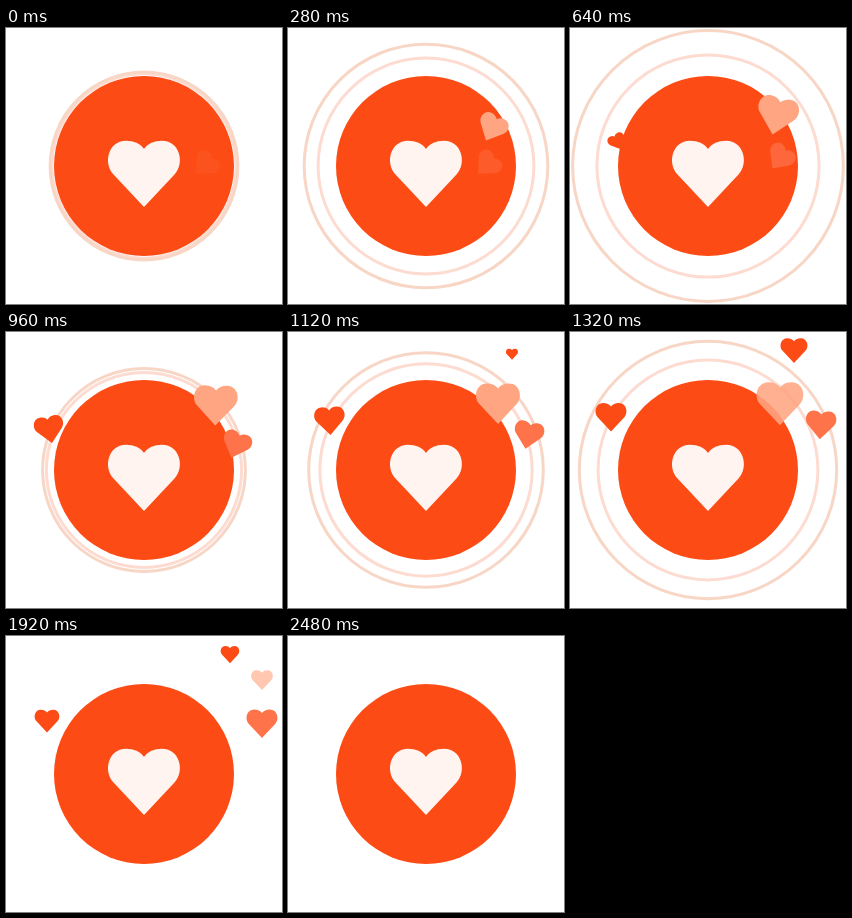
Animation of 276 by 276 pixels, one loop 3.92 s. Source, as an HTML page with a canvas:

```html
<!DOCTYPE html>
<html lang="en">
<head>
<meta charset="utf-8">
<title>Heart pulse</title>
<style>
  html, body { margin: 0; width: 100%; height: 100%; overflow: hidden; background: #fff; }
  canvas { display: block; }
</style>
</head>
<body>
<canvas id="stage" width="276" height="276"></canvas>
<script>
const ctx = document.getElementById('stage').getContext('2d');
const LOOP = 3920, STEP = 40, END = 2480, MID = 138, RADIUS = 90;
const RED = '#fc4b14', CORAL = '#ff734a', PEACH = '#ffa582';

// Heart 72 units wide, centred on the origin
const HEART = new Path2D('M0 33.5 L-30.5 1 C-41 -10 -36 -32.7 -18 -32.7 C-10 -32.7 -4 -30 0 -24.5 C4 -30 10 -32.7 18 -32.7 C36 -32.7 41 -10 30.5 1 Z');

// Each heart pops in, drifts upright to its place, then shrinks or swells and fades away
const hearts = [
  { color: CORAL, size: 31, pop: -600, drift: 280, settle: 1560, from: [199, 137], to: [256, 87.5], tilt: 45, leave: 1920, emerge: 960 },
  { color: PEACH, size: 44, pop: 20, drift: 200, settle: 1080, from: [204, 100.5], to: [210, 71.5], tilt: 27, leave: 1270, swell: true },
  { color: RED, size: 31, pop: 440, drift: 480, settle: 1280, from: [48, 116], to: [41, 85], tilt: -30, leave: 1840 },
  { color: RED, size: 31, pop: 1000, drift: 1000, settle: 1280, from: [224, 24], to: [224, 18.5], tilt: 0, leave: 1760 },
  { color: PEACH, size: 18.6, pop: 1480, drift: 1480, settle: 1800, from: [256, 50], to: [256, 44], tilt: 0, leave: 1600, span: 880, swell: true }
];

const ramp = (t, from, to) => Math.min(1, Math.max(0, (t - from) / (to - from)));
const mix = (a, b, p) => a + (b - a) * p;
const smooth = p => p * p * (3 - 2 * p);
const easeOut = p => 1 - (1 - p) ** 2;

function drawHeart(x, y, width, degrees, color, alpha = 1) {
  ctx.save();
  ctx.translate(x, y);
  ctx.rotate(degrees * Math.PI / 180);
  ctx.scale(width / 72, width / 72);
  ctx.globalAlpha = alpha;
  ctx.fillStyle = color;
  ctx.fill(HEART);
  ctx.restore();
}

function drawFlyer(t, h) {
  const p = smooth(ramp(t, h.drift, h.settle));
  const out = ramp(t, h.leave, h.leave + (h.span || 400));
  const enter = easeOut(ramp(t, h.pop, h.pop + 500));
  const width = h.size * enter * mix(0.87, 1, p) * (h.swell ? 1 + out / 2 : 1 - out);
  const shown = h.emerge ? ramp(t, -200, h.emerge) : 1;
  // Height lags behind so that the path bends upwards
  drawHeart(mix(h.from[0], h.to[0], p), mix(h.from[1], h.to[1], p ** 1.2), width,
    h.tilt * (1 - p), h.color, shown * (h.swell ? 1 - out : 1));
}

function circle(r) {
  ctx.beginPath();
  ctx.arc(MID, MID, r, 0, Math.PI * 2);
}

function drawRing(age, base, reach, rate, color) {
  circle(base + reach * (1 - Math.exp(-rate * age)));
  ctx.lineWidth = 3;
  ctx.strokeStyle = color;
  ctx.stroke();
}

function drawPulse(age) {
  if (age < 0 || age > 900) return;
  ctx.globalAlpha = 1 - ramp(age, 690, 900);
  drawRing(age, RADIUS - 1, 22.5, 0.006, '#fddbd0');
  drawRing(age, RADIUS, 52, 0.0031, '#f8d6c6');
  ctx.globalAlpha = 1;
}

function draw(t) {
  ctx.fillStyle = '#fff';
  ctx.fillRect(0, 0, 276, 276);
  if (t < END) [-25, 880].forEach(start => drawPulse(t - start));
  circle(RADIUS);
  ctx.fillStyle = RED;
  ctx.fill();
  drawHeart(MID, 145.5, 72, 0, '#fff4f0');
  hearts.forEach(h => drawFlyer(t, h));
}

const begin = performance.now();
function tick() {
  const t = (performance.now() - begin) % LOOP;
  draw(Math.floor(t / STEP) * STEP);
  requestAnimationFrame(tick);
}
tick();
</script>
</body>
</html>
```
